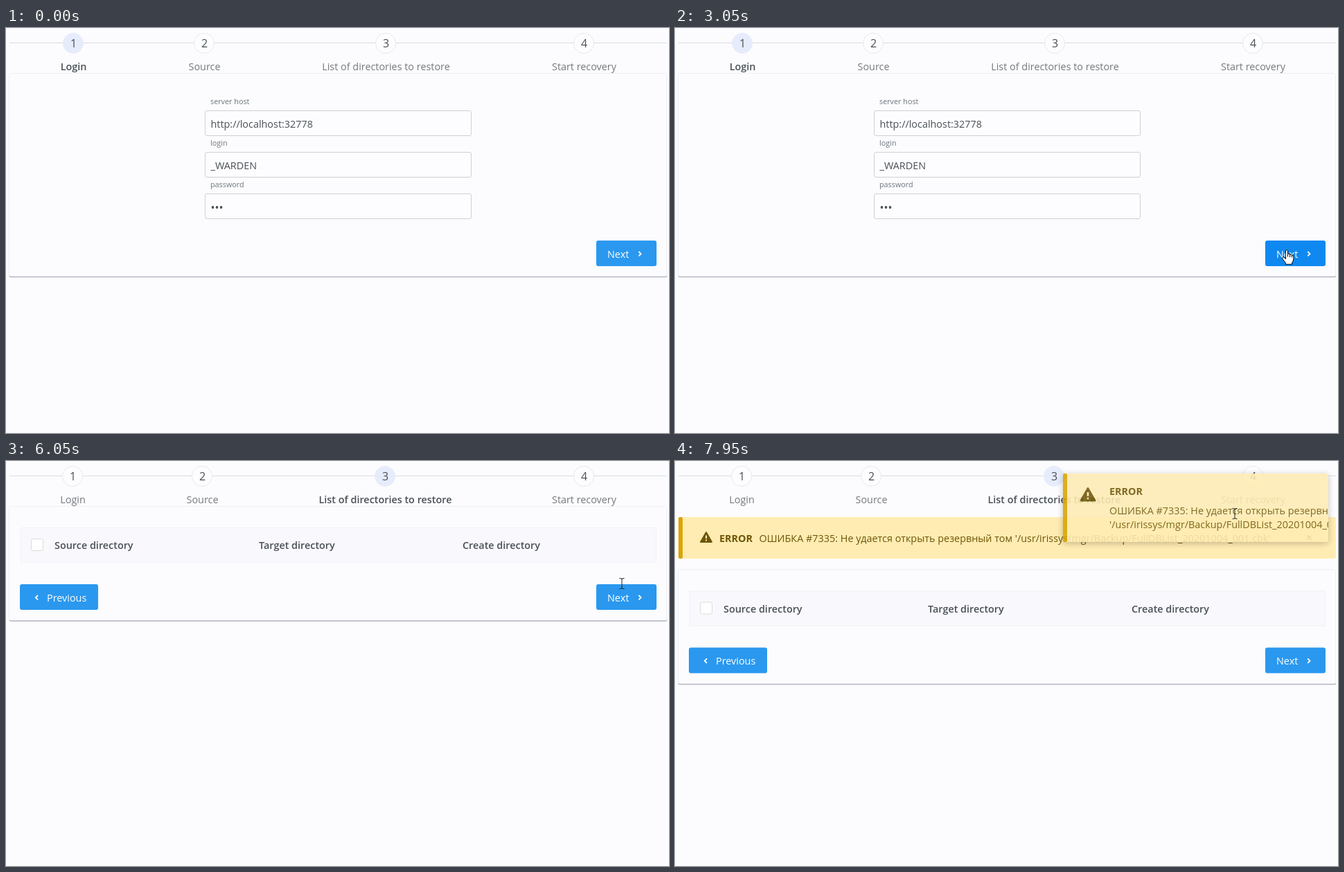
An HTML page that plays this animation: 957 px wide and 585 px high, repeating every 8 s.

```html
<!DOCTYPE html>
<html lang="en">
<head>
<meta charset="utf-8">
<title>Recovery wizard</title>
<style>
  html, body { margin: 0; width: 100%; height: 100%; overflow: hidden; background: #fcfcfe; }
  svg { display: block; }
  #stage { font: 14.4px "Open Sans", "Noto Sans", sans-serif; fill: #495057; }
  .small { font-size: 10.8px; fill: #6c757d; }
  .number { font-size: 16px; }
  .muted { fill: #74787e; }
  .bold { font-weight: 600; }
  .heavy { font-weight: 700; }
  .mid { text-anchor: middle; }
  .warn { fill: #6f5606; }
  .field { fill: #fdfdff; stroke: #ced0d6; }
  .button text { fill: #fff; }
  .button polyline { fill: none; stroke: #fff; stroke-width: 1.8; }
  .button rect { fill: #2a98ef; }
  #toast > rect:first-child { filter: drop-shadow(0 2px 5px #0004); }
</style>
</head>
<body>
<svg id="stage" width="957" height="585" viewBox="0 0 957 585"></svg>
<script>
const LOOP = 8000, SOURCE_AT = 4300, LIST_AT = 5900, ERROR_AT = 6100;
const stage = document.getElementById('stage');
const backup = '/usr/irissys/mgr/Backup/FullDBList_20201004_001.cbk';
const error = 'ОШИБКА #7335: Не удается открыть резервный том';

const text = (x, y, str, cls = '', more = '') =>
  `<text x="${x}" y="${y}" class="${cls}" ${more}>${str}</text>`;
const rect = (x, y, w, h, more = '') =>
  `<rect x="${x}" y="${y}" width="${w}" height="${h}" ${more}/>`;

const field = (x, y, w, label, value, more) =>
  text(x + 8, y - 9, label, 'small') +
  rect(x + .5, y + .5, w - 1, 36, 'rx="2.5" class="field"') +
  text(x + 8.5, y + 24.5, value, '', more);

const previous = y => `<g class="button" transform="translate(20 ${y})">
  ${rect(0, 0, 113, 37, 'rx="3"')}<polyline points="26,16 22.8,19.2 26,22.4"/>
  ${text(39, 24.5, 'Previous')}</g>`;
const next = y => `<g class="button next" transform="translate(852 ${y})">
  ${rect(0, 0, 87, 37, 'rx="3"')}<polyline points="61.3,16 64.5,19.2 61.3,22.4"/>
  ${text(16, 24.5, 'Next')}</g>`;

const panel = (top, bottom) =>
  rect(4.5, top + .5, 949, bottom - top - 1, 'rx="3" fill="none" stroke="#efeff4"') +
  `<path d="M5 ${bottom - 2}q0 1.5 2 1.5H952q2 0 2-1.5" fill="none" stroke="#b4b4c2" stroke-width="1.3"/>`;

const titles = ['Login', 'Source', 'List of directories to restore', 'Start recovery'];
const steps = (active, centers) =>
  '<path d="M5 21.5H954" stroke="#d9dbe3"/>' + centers.map((x, i) => {
    const on = i === active;
    return `<circle cx="${x}" cy="22" r="14.5" fill="${on ? '#e6ecfb' : '#fdfdff'}" stroke="${on ? '#e6ecfb' : '#e8e8ee'}"/>` +
      text(x + .5, 28, i + 1, 'mid number') +
      text(x + .5, 61, titles[i], on ? 'mid bold' : 'mid muted');
  }).join('');

const warning = (x, y, size) =>
  `<g transform="translate(${x} ${y}) scale(${size / 18})">
    <path class="warn" d="M9 1L17 15H1Z" stroke="#6f5606" stroke-width="2" stroke-linejoin="round"/>
    <path d="M9 5.5V10M9 11.6V13.6" stroke="#ffecb3" stroke-width="2"/></g>`;

stage.innerHTML = `
<g class="page">${steps(0, [97, 286, 548, 834])}${panel(65, 360)}
  ${field(287, 119, 385, 'server host', 'http://localhost:32778')}
  ${field(287, 179, 385, 'login', '_WARDEN')}
  ${field(287, 239, 385, 'password', '•••', 'font-size="16" dy="1"')}
  ${next(307)}</g>
<g class="page">${steps(1, [96, 286, 548, 834])}${panel(65, 217)}
  ${field(20, 96, 720, 'full backup file name', backup)}
  ${previous(164)}${next(164)}</g>
<g class="page">${steps(2, [96, 283, 547, 834])}
  <g id="list">${panel(65, 231.5)}
    ${rect(21.5, 96.5, 917, 50, 'fill="#f9f8fd" stroke="#f2f1f6"')}
    ${rect(36.5, 112.5, 17, 17, 'rx="2" fill="#fff" stroke="#dcdbd8"')}
    ${text(70, 127, 'Source directory', 'bold')}
    ${text(365, 127, 'Target directory', 'bold')}
    ${text(659, 127, 'Create directory', 'bold')}
    ${previous(178)}${next(178)}</g>
  <g id="message">
    ${rect(5, 81, 949, 60, 'rx="3" fill="#ffecb3"')}${rect(5, 81, 6, 60, 'rx="2" fill="#d9a300"')}
    ${warning(36, 102, 18)}${text(64, 117, 'ERROR', 'warn heavy')}
    ${text(121.5, 117, `${error} '${backup}'`, 'warn')}
    <path d="M912.5 107.5l6 6m0-6l-6 6" stroke="#6f5606" stroke-width="1.5"/></g>
  <g id="toast">
    ${rect(560, 18, 383, 99, 'rx="3" fill="#ffecb3"')}${rect(560, 18, 6, 99, 'rx="2" fill="#d9a300"')}
    ${warning(584.5, 38, 23)}${text(627, 49, 'ERROR', 'warn heavy')}
    <svg x="560" y="18" width="383" height="99">
      ${text(67, 59, error, 'warn')}${text(67, 79, `'${backup}'`, 'warn')}</svg></g>
</g>
<g id="cursor">
  <path id="arrow" d="M.5 .5V16.2L4.2 12.7 6.7 18.5 9 17.5 6.6 11.8H11.5Z" fill="#fff" stroke="#000"/>
  <path id="hand" d="M-1.5 1.5Q0-.5 1.5 1.5V6.5Q3.5 5 4.5 7.3 6.5 6 7.3 8.2 9.5 7.3 9.8 10V14Q9.5 17 7.7 19V21.3H-1.5V19.5L-6.5 13Q-6.5 10-4 11.2L-1.5 13.5ZM1.5 6.5V10.5M4.5 7.3V11M7.3 8.2V11.5" fill="#fff" stroke="#000" stroke-linejoin="round"/>
  <path id="beam" d="M-3-7.5H-1Q.5-7.5 .5-6 .5-7.5 2-7.5H4M.5-6.5V6.5M-3 7.5H-1Q.5 7.5 .5 6 .5 7.5 2 7.5H4" fill="none" stroke="#222"/>
</g>`;

const $ = id => document.getElementById(id);
const pages = stage.querySelectorAll('.page');
const nextFills = [...stage.querySelectorAll('.next rect')];
const show = (el, on) => el.setAttribute('display', on ? 'inline' : 'none');
const move = (el, x, y) => el.setAttribute('transform', `translate(${x} ${y})`);
const ramp = (t, from, span) => Math.min(1, Math.max(0, (t - from) / span));

// Pointer stops: time, x, y
const route = [
  [250, 906, 585], [800, 925, 535], [1000, 925, 535], [1300, 940, 487], [1450, 940, 487],
  [1950, 951, 345], [2250, 910, 328], [2850, 883, 320], [4300, 883, 320], [4350, 881.5, 320],
  [5000, 881.5, 320], [5600, 888.5, 177], [6700, 888.5, 177], [7550, 238, 223], [7950, 807.5, 76]
];

function pointer(t) {
  const i = route.findIndex(stop => stop[0] > t);
  if (i < 1) return i ? route.at(-1).slice(1) : route[0].slice(1);
  const [t0, x0, y0] = route[i - 1], [t1, x1, y1] = route[i];
  const u = (t - t0) / (t1 - t0), k = u * u * (3 - 2 * u);
  return [x0 + (x1 - x0) * k, y0 + (y1 - y0) * k];
}

function hoverColor(k) {
  const mix = (a, b) => Math.round(a + (b - a) * k);
  return `rgb(${mix(42, 15)},${mix(152, 137)},${mix(239, 240)})`;
}

function draw(t) {
  const page = t < SOURCE_AT ? 0 : t < LIST_AT ? 1 : 2;
  pages.forEach((el, i) => show(el, i === page));
  nextFills[0].style.fill = hoverColor(ramp(t, 2250, 200));
  nextFills[1].style.fill = hoverColor(ramp(t, 5500, 200));

  const failed = t >= ERROR_AT, k = 1 - (1 - ramp(t, ERROR_AT, 300)) ** 2;
  move($('list'), 0, failed ? 91.5 : 0);
  for (const [id, offset, alpha] of [['message', -15, 1], ['toast', 99, .88]]) {
    show($(id), failed);
    move($(id), 0, offset * (1 - k));
    $(id).setAttribute('opacity', alpha * k);
  }

  const [x, y] = pointer(t);
  const overButton = (t >= 2250 && t < SOURCE_AT) || (t >= 5500 && t < LIST_AT);
  const overText = (t >= LIST_AT && t < ERROR_AT) || (t > 7600 && y < 125);
  const kind = overButton ? 'hand' : overText ? 'beam' : 'arrow';
  for (const id of ['arrow', 'hand', 'beam']) show($(id), id === kind);
  move($('cursor'), x, y);
}

function tick() {
  draw(performance.now() % LOOP);
  requestAnimationFrame(tick);
}
tick();
</script>
</body>
</html>
```
